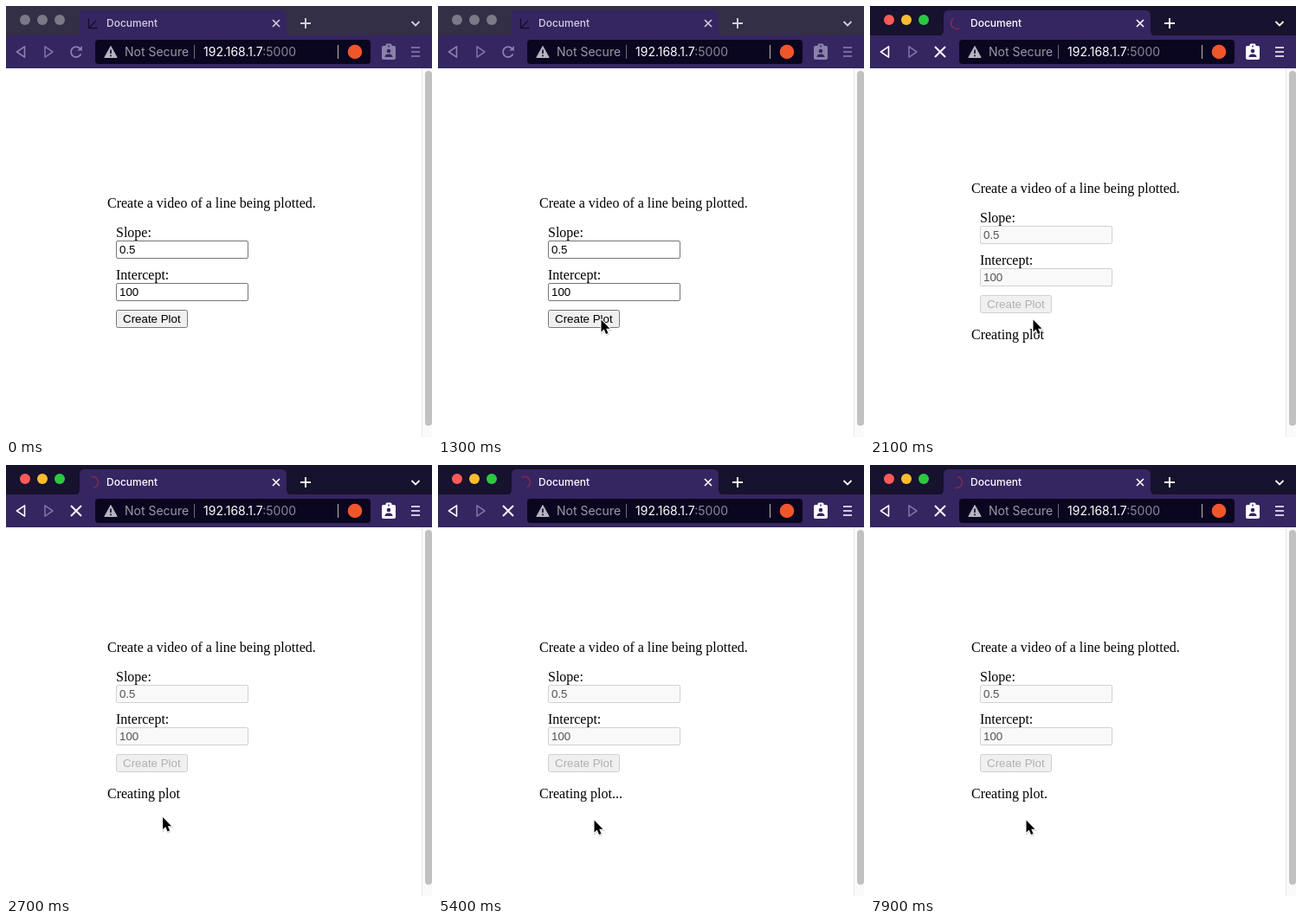
Animation, 492 px wide and 498 px high, one loop 8 s. Source, as an HTML page:

```html
<!DOCTYPE html>
<html lang="en">
<head>
<meta charset="utf-8">
<title>Document</title>
<style>
  html, body { margin: 0; width: 100%; height: 100%; overflow: hidden; background: #fff; }
  svg { display: block; width: 492px; height: 498px; }
  text { white-space: pre; }
  .ui { font-family: Inter, Roboto, sans-serif; }
  .serif { font: 16px "Liberation Serif", "Times New Roman", serif; }
  .sans { font: 13.333px "Liberation Sans", Arial, sans-serif; }

  /* Browser frame, unfocused by default */
  svg { --bar: #332f47; --icon: #8b82ab; --tab: #d3cfdf; --back: #8b82ab; }
  svg.focus { --bar: #17122d; --icon: #fff; --tab: #fff; --back: #fff; }
  .light { fill: #7b7888; }
  .focus .red { fill: #fc5b57; }
  .focus .yellow { fill: #fdbc2f; }
  .focus .green { fill: #2ac940; }
  .line { fill: none; stroke-width: 1.6; }
  .icon { stroke: var(--icon); }
  .tab { stroke: var(--tab); }

  /* Form */
  .field { fill: #fff; stroke: #767676; }
  .button { fill: #efefef; stroke: #767676; }
  .busy .field { fill: #f9f9f9; stroke: #d1d1d1; }
  .busy .button { fill: #f0f0f0; stroke: #d1d1d1; }
  .busy .value { fill: #545454; }
  .busy .caption { fill: #b0b0b0; }

  .loading { display: none; }
  .busy .loading { display: inline; }
  .busy .idle { display: none; }
</style>
</head>
<body>
<svg id="stage" viewBox="0 0 492 498">
  <rect width="492" height="498" fill="#fff"/>

  <!-- Tab strip -->
  <rect width="492" height="36" fill="var(--bar)"/>
  <circle class="light red" cx="22" cy="16" r="6"/>
  <circle class="light yellow" cx="42" cy="16" r="6"/>
  <circle class="light green" cx="62" cy="16" r="6"/>
  <path d="M78 35Q85 35 85 28V11Q85 5 91 5H318Q324 5 324 11V28Q324 35 331 35Z" fill="#352561"/>
  <path class="idle line" d="M95.5 14V25.5H106M96 25L104 17" stroke="#15102b" style="stroke-width:1.3"/>
  <path class="loading line" id="spinner" stroke="#7d2d50"/>
  <text class="ui" x="116" y="24" font-size="12" font-weight="500" fill="var(--tab)">Document</text>
  <path class="line tab" d="M308 16L316 24M316 16L308 24"/>
  <path class="line tab" d="M340 20H352M346 14V26" style="stroke-width:1.9"/>
  <path class="line tab" d="M468.5 18L473 22.5L477.5 18" style="stroke-width:1.8"/>

  <!-- Toolbar -->
  <rect y="34" width="492" height="38" fill="#352561"/>
  <path class="line" d="M12.5 53L21.5 46.8V59.2Z" stroke="var(--back)" stroke-linejoin="round"/>
  <path class="line" d="M54 53L45 46.8V59.2Z" stroke="#7d739f" stroke-linejoin="round"/>
  <g class="idle">
    <path class="line icon" d="M86.6 55.3A6 6 0 1 1 85.3 48.8" style="stroke-width:1.8"/>
    <path d="M87.8 46V51.5H82.3Z" fill="var(--icon)"/>
  </g>
  <path class="loading line icon" d="M75 47L87 59M87 47L75 59" style="stroke-width:2"/>

  <rect x="103" y="39" width="318" height="28" rx="4" fill="#0b0620"/>
  <path d="M121 46.5L128.2 59.5H113.8Z" fill="#b7b4c1" stroke="#b7b4c1" stroke-linejoin="round"/>
  <path d="M121 50.5V55M121 56.5V58.2" stroke="#0b0620" stroke-width="1.6"/>
  <g class="ui" font-size="14">
    <text x="137" y="58" fill="#9b98a8">Not Secure</text>
    <text x="228" y="58" fill="#fff">192.168.1.7<tspan fill="#8b8899">:5000</tspan></text>
  </g>
  <path d="M217.5 45V61" stroke="#6f6b7e"/>
  <path d="M383.5 45V61" stroke="#b7b4c1"/>
  <circle cx="403" cy="53" r="8.3" fill="#f1562b"/>

  <rect x="434" y="46" width="16" height="16" rx="2" fill="var(--icon)"/>
  <rect x="438.5" y="43.5" width="7" height="5" rx="1.5" fill="var(--icon)"/>
  <path d="M437.5 59Q437.5 55.5 442 55.5T446.5 59Z" fill="#352561"/>
  <circle cx="442" cy="52" r="2.3" fill="#352561"/>
  <circle cx="442" cy="46.5" r="1" fill="#352561"/>
  <path class="line icon" d="M468 48H478M468 53H478M468 58H478" style="stroke-width:1.5"/>

  <!-- Page -->
  <g id="form">
    <g class="serif">
      <text x="117" y="233">Create a video of a line being plotted.</text>
      <text x="127" y="267">Slope:</text>
      <text x="127" y="316">Intercept:</text>
    </g>
    <rect class="field" x="127.5" y="271.5" width="152" height="20" rx="1.5"/>
    <rect class="field" x="127.5" y="320.5" width="152" height="20" rx="1.5"/>
    <rect class="button" x="127.5" y="351.5" width="82" height="20" rx="2"/>
    <g class="sans">
      <text class="value" x="131" y="286">0.5</text>
      <text class="value" x="131" y="335">100</text>
      <text class="caption" x="135" y="366">Create Plot</text>
    </g>
  </g>
  <text class="loading serif" id="status" x="117" y="385"></text>

  <!-- Scrollbar -->
  <rect x="480" y="72" width="12" height="426" fill="#fafafa"/>
  <path d="M480.5 72V498" stroke="#e8e8e8"/>
  <rect x="484" y="75" width="8" height="410" rx="4" fill="#c1c1c1"/>

  <g id="cursor">
    <path d="M0 0V14L3.2 11.1L5.5 16.5L8 15.4L5.7 10.2H10Z" transform="translate(.4 1.2)"
      fill="#000" stroke="#000" stroke-width="2" opacity=".15"/>
    <path d="M0 0V14L3.2 11.1L5.5 16.5L8 15.4L5.7 10.2H10Z" fill="#000" stroke="#fff"
      stroke-width="2" paint-order="stroke" stroke-linejoin="round"/>
  </g>
</svg>

<script>
  const LOOP = 8000, TICK = 100, FOCUS = 1400, SUBMIT = 2000;
  const SPIN = 1320, DOT = 1000;
  const $ = id => document.getElementById(id);
  const stage = $("stage"), form = $("form"), status = $("status");
  const spinner = $("spinner"), cursor = $("cursor");

  const smooth = u => u * u * (3 - 2 * u);
  const easeOut = u => 1 - (1 - u) ** 2;
  const moves = [
    { start: 500, end: 1300, from: [226, 486], to: [188.5, 362.5], ease: easeOut },
    { start: 2200, end: 2800, from: [188.5, 362.5], to: [180.5, 410.5], ease: smooth }
  ];

  function cursorAt(t) {
    const move = moves.filter(m => t >= m.start).pop();
    if (!move) return [0, 520];
    const u = move.ease(Math.min(1, (t - move.start) / (move.end - move.start)));
    return move.from.map((a, i) => a + (move.to[i] - a) * u);
  }

  // Half circle turning counter-clockwise around the tab icon
  function halfArc(angle) {
    const dx = 6.5 * Math.cos(angle), dy = 6.5 * Math.sin(angle);
    return `M${100 + dx} ${20 + dy}A6.5 6.5 0 0 0 ${100 - dx} ${20 - dy}`;
  }

  function draw(t) {
    const busy = t >= SUBMIT, elapsed = Math.max(0, t - SUBMIT);
    stage.classList.toggle("focus", t >= FOCUS);
    stage.classList.toggle("busy", busy);
    form.setAttribute("transform", `translate(0 ${busy ? -17 : 0})`);
    status.textContent = "Creating plot" + ".".repeat(Math.floor(elapsed / DOT) % 4);
    spinner.setAttribute("d", halfArc(-Math.PI / 2 - 2 * Math.PI * elapsed / SPIN));
    cursor.setAttribute("transform", `translate(${cursorAt(t)})`);
  }

  const origin = performance.now();
  function frame() {
    const t = (performance.now() - origin) % LOOP;
    draw(Math.floor(t / TICK) * TICK);
    requestAnimationFrame(frame);
  }
  frame();
</script>
</body>
</html>
```
